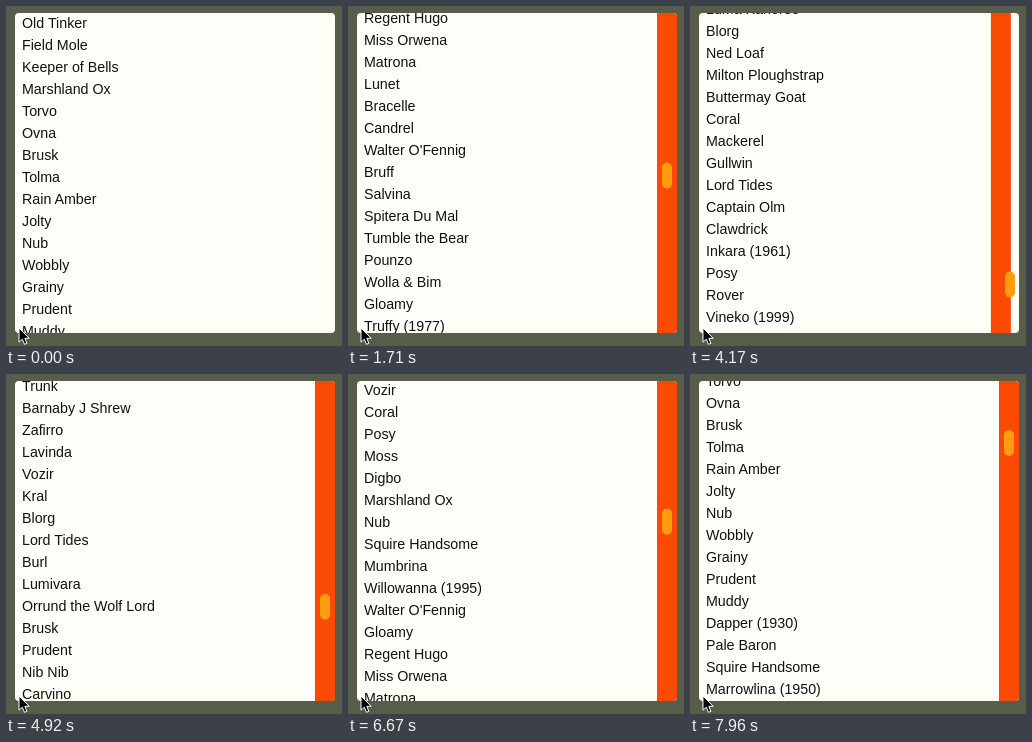
An HTML page for the animation above (8000 ms loop, 336 by 340 pixels).

```html
<!DOCTYPE html>
<html lang="en">
<head>
<meta charset="utf-8">
<title>Scrolling name list</title>
<style>
  html, body { margin: 0; width: 100%; height: 100%; overflow: hidden; background: #585c4a; }
  #panel {
    position: absolute; left: 9px; top: 7px; width: 320px; height: 320px;
    overflow: hidden; border-radius: 4px; background: #fffffa;
  }
  #list {
    position: absolute; left: 7px; top: -1px; color: #111; white-space: nowrap;
    font: 14.25px/22px "Liberation Sans", Arial, sans-serif;
  }
  #list div { height: 22px; }
  #track { position: absolute; left: 300px; top: 0; width: 20px; height: 320px; background: #fb4a04; }
  #thumb { position: absolute; left: 305px; top: 0; width: 10px; height: 26px; border-radius: 5px; background: #ff9d10; }
  #pointer { position: absolute; left: 12px; top: 321px; }
</style>
</head>
<body>
<div id="panel">
  <div id="list"></div>
  <div id="track"></div>
  <div id="thumb"></div>
</div>
<svg id="pointer" width="13" height="19">
  <path d="M1 1V15.2L4.3 12.2L6.5 17.3L8.9 16.3L6.8 11.3H11.2Z" fill="#000" stroke="#fff"/>
</svg>
<script>
const LOOP = 8000, ROW_COUNT = 154;

// Names keyed by the row at which each run begins.
const runs = {
  0: "Old Tinker,Field Mole,Keeper of Bells,Marshland Ox,Torvo,Ovna,Brusk,Tolma,Rain Amber,Jolty,Nub," +
     "Wobbly,Grainy,Prudent,Muddy,Dapper (1930),Pale Baron,Squire Handsome,Marrowlina (1950),Pip Pip," +
     "Nib Nib,River Housemaid,Dame Corvenna,Ottoveria,Mumbrina,Woodricko (1940),Tobbin Beetles,Carvino," +
     "Modest Hugh and Barlow,Grandolfo (1950),Teal Nymph,Willowanna (1995)",
  60: "Regent Hugo,Miss Orwena,Matrona,Lunet,Bracelle,Candrel,Walter O'Fennig,Bruff,Salvina," +
      "Spitera Du Mal,Tumble the Bear,Pounzo,Wolla & Bim,Gloamy,Truffy (1977)",
  86: "Brute,Hulmar,Tinkard,Du Sot,Wickard,Springley,Mrs Ladle,Mugg,Fern,Trunk,Barnaby J Shrew," +
      "Zafirro,Lavinda,Vozir,Kral",
  120: "Luma Kahoree,Blorg,Ned Loaf,Milton Ploughstrap,Buttermay Goat,Coral,Mackerel,Gullwin,Lord Tides," +
       "Captain Olm,Clawdrick,Inkara (1961),Posy,Rover,Vineko (1999)",
  136: "Burl,Thaddeus Stoat,Countess Talwyra,Frostpetal,Moss,Brookshine,Galea,Lumivara,Poppina (1999)," +
       "Rahko,Suvi,Digbo,Snorta,Gash,Orrund the Wolf Lord"
};

// Scroll path: [time ms, offset px, speed px/ms]
const path = [
  [0, 0, 0], [1710, 1325, 1.2], [3000, 2989, 0.5], [3260, 3067, 0], [3880, 3067, 0],
  [4170, 2654, -1.1], [5670, 1893, -0.15], [5880, 1872, -0.1], [7210, 379, -0.8],
  [7960, 98, -0.15], [LOOP, 94, 0]
];

const [list, track, thumb] = ["list", "track", "thumb"].map(id => document.getElementById(id));
const clamp = x => Math.min(1, Math.max(0, x));

function buildList() {
  const rows = [], pool = Object.values(runs).join(",").split(",");
  for (const [start, names] of Object.entries(runs))
    names.split(",").forEach((name, i) => rows[+start + i] = name);
  for (let i = 0; i < ROW_COUNT; i++) {
    const row = document.createElement("div");
    row.textContent = rows[i] || pool[i * 7 % pool.length];
    list.append(row);
  }
}

// Cubic Hermite interpolation along the path
function scrollAt(t) {
  const i = path.findIndex(key => key[0] > t);
  const [t0, y0, v0] = path[i - 1], [t1, y1, v1] = path[i];
  const d = t1 - t0, u = (t - t0) / d, w = 1 - u;
  return y0 * w * w * (1 + 2 * u) + y1 * u * u * (3 - 2 * u) + d * u * w * (v0 * w - v1 * u);
}

const backOut = p => 1 + 5.2 * (p - 1) ** 3 + 4.2 * (p - 1) ** 2;
const cubicOut = p => 1 - (1 - p) ** 3;

// Horizontal shift of a bar part: slides in when scrolling starts, out after it rests
function barShift(t, ease, duration) {
  const leaving = t >= 3480 && t < 3930;
  if (leaving) return 20 * clamp((t - 3480) / 350) ** 2;
  const start = t < 3480 ? 40 : 3930;
  return 20 * (1 - ease(clamp((t - start) / duration)));
}

function draw(now) {
  const t = now % LOOP, y = scrollAt(t);
  list.style.transform = `translateY(${-Math.round(y)}px)`;
  track.style.transform = `translateX(${barShift(t, backOut, 520)}px)`;
  thumb.style.transform = `translate(${barShift(t, cubicOut, 380)}px, ${41 + y / 12.2}px)`;
}

buildList();
let origin;
function tick(now) {
  origin ??= now;
  draw(Math.max(0, now - origin));
  requestAnimationFrame(tick);
}
draw(0);
requestAnimationFrame(tick);
</script>
</body>
</html>
```
